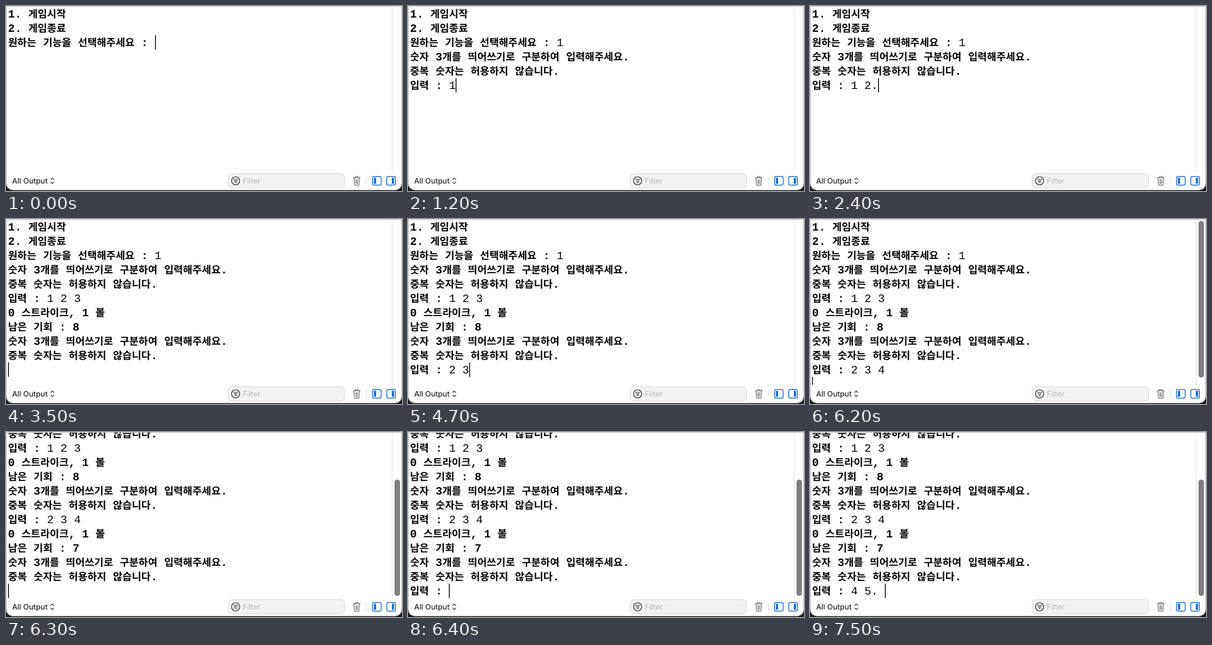
An HTML page that plays this animation: 582x272 px, repeating every 8000 ms.

```html
<!DOCTYPE html>
<html lang="ko">
<head>
<meta charset="utf-8">
<title>Console</title>
<style>
  html, body { margin: 0; width: 100%; height: 100%; overflow: hidden; background: #1c1c1c; }
  svg { display: block; }
  text { white-space: pre; text-rendering: geometricPrecision; }
  .log { font: 700 16.48px "Liberation Mono", monospace; fill: #000; }
  .ko { font: 700 15.06px "Noto Sans CJK KR", "Noto Sans CJK", sans-serif; }
  .typed { font-weight: 400; }
  .ui { font: 500 11px Inter, sans-serif; fill: #262626; }
  .hint { font-weight: 400; fill: #bcbcbc; }
  .line { fill: none; stroke-linecap: round; stroke-linejoin: round; }
</style>
</head>
<body>
<svg width="582" height="272" viewBox="0 0 582 272">
  <defs>
    <clipPath id="pane"><rect x="1" y="1" width="566" height="243"/></clipPath>
  </defs>

  <path d="M0 0H582V261a10 10 0 0 1-10 10H10a10 10 0 0 1-10-10Z" fill="#c4c4c4"/>
  <path d="M1 1H581V261a9 9 0 0 1-9 9H10a9 9 0 0 1-9-9Z" fill="#fff"/>
  <path d="M567.5 1V244" stroke="#e6e6e6"/>

  <g clip-path="url(#pane)">
    <g id="scroll">
      <g id="log" class="log"></g>
      <rect id="caret" width="1.2" height="21"/>
    </g>
  </g>
  <rect id="knob" x="571" width="8" rx="4" fill="#7f7f7f"/>

  <text class="ui" x="9" y="261">All Output</text>
  <path class="line" d="M65.8 255.2l2.2-2.4 2.2 2.4M65.8 258.8l2.2 2.4 2.2-2.4" stroke="#333" stroke-width="1.1"/>

  <rect x="326.5" y="246.5" width="171" height="21" rx="5.5" fill="#f2f2f2" stroke="#dcdcdc"/>
  <g class="line" stroke="#3a3a3a" stroke-width="1.1">
    <circle cx="337.5" cy="257" r="6"/>
    <path d="M334.3 255h6.4M335.4 257.2h4.2M336.6 259.4h1.8"/>
  </g>
  <text class="ui hint" x="348" y="261">Filter</text>

  <g class="line" stroke="#6a6a6a">
    <path d="M510.5 252.5h10M513.5 252.3v-1.6h4v1.6M511.5 252.7l.7 10.8h6.6l.7-10.8"/>
    <path d="M513.8 254.8l.3 6.5M515.5 254.8v6.5M517.2 254.8l-.3 6.5" stroke-width=".8"/>
  </g>
  <path d="M529.5 251V264" stroke="#e2e2e2"/>

  <g fill="none" stroke="#1f6fd0" stroke-width="1.2">
    <rect x="538.6" y="250.6" width="12.8" height="12.8" rx="2.4"/>
    <rect x="559.6" y="250.6" width="12.8" height="12.8" rx="2.4"/>
  </g>
  <g fill="#1f6fd0">
    <rect x="540.6" y="252.6" width="3.4" height="8.8" rx=".8"/>
    <rect x="567" y="252.6" width="3.4" height="8.8" rx=".8"/>
  </g>
</svg>
<script>
const LOOP = 8000, ROW = 21, LEFT = 3;
const KO_W = 13.86, MONO_W = 9.89;
const svgNs = 'http://www.w3.org/2000/svg';
const $ = id => document.getElementById(id);

const ask = ['숫자 3개를 띄어쓰기로 구분하여 입력해주세요.', '중복 숫자는 허용하지 않습니다.'];
const prompt = '입력 : ';
const score = left => ['0 스트라이크, 1 볼', '남은 기회 : ' + left];

// Each line is [label, text the user entered]
const lines = [
  ['1. 게임시작'], ['2. 게임종료'], ['원하는 기능을 선택해주세요 : ', '1'],
  ...ask.map(s => [s]), [prompt, '1 2 3'],
  ...[...score(8), ...ask].map(s => [s]), [prompt, '2 3 4'],
  ...[...score(7), ...ask].map(s => [s]), [prompt]
];

// [ms, visible lines, input on the last one]; no input: caret waits on the next line
const steps = [
  [0, 3, ''], [200, 3, '1'],
  [700, 5], [800, 6, ''],
  [1200, 6, '1'], [1300, 6, '1 '], [1500, 6, '1 2'], [1600, 6, '1 2 '], [1800, 6, '1 2. '],
  [2400, 6, '1 2.'], [2800, 6, '1 2'], [3000, 6, '1 2 '], [3200, 6, '1 2 3'],
  [3500, 10], [3600, 11, ''],
  [4200, 11, '2'], [4400, 11, '2 '], [4700, 11, '2 3'], [4800, 11, '2 3 '], [5100, 11, '2 3. '],
  [5500, 11, '2 3.'], [5600, 11, '2 3'], [5800, 11, '2 3 '], [6000, 11, '2 3 4'],
  [6200, 11], [6300, 15], [6400, 16, ''],
  [6700, 16, '4'], [6900, 16, '4 '], [7100, 16, '4 5'], [7300, 16, '4 5 '], [7500, 16, '4 5. ']
];

function add(parent, tag, cls, text) {
  const el = document.createElementNS(svgNs, tag);
  if (cls) el.setAttribute('class', cls);
  if (text) el.textContent = text;
  return parent.appendChild(el);
}

function set(el, attrs) {
  for (const k in attrs) el.setAttribute(k, attrs[k]);
}

const widthOf = s => [...s].reduce((w, c) => w + (/[가-힣]/.test(c) ? KO_W : MONO_W), 0);

const rows = lines.map(([label], i) => {
  const row = add($('log'), 'text');
  set(row, { x: LEFT, y: 17 + ROW * i, 'xml:space': 'preserve' });
  for (const run of label.match(/[가-힣]+|[^가-힣]+/g))
    add(row, 'tspan', /[가-힣]/.test(run) ? 'ko' : '', run);
  return { row, typed: add(row, 'tspan', 'typed') };
});

function show([ms, count, input]) {
  const waiting = input === undefined;
  rows.forEach(({ row, typed }, i) => {
    row.style.display = i < count ? '' : 'none';
    typed.textContent = i === count - 1 && !waiting ? input : lines[i][1] || '';
  });
  const x = waiting ? LEFT : LEFT + widthOf(lines[count - 1][0] + input);
  set($('caret'), { x: Math.round(x), y: 1 + ROW * (waiting ? count : count - 1) });

  const scrolled = count > 11;
  set($('scroll'), { transform: `translate(0 ${scrolled ? -93 : 0})` });
  set($('knob'), scrolled ? { y: 70, height: 171 } : { y: 3, height: 230 });
  $('knob').style.display = ms >= 6200 ? '' : 'none';
}

let current;
const start = performance.now();
function tick() {
  const t = (performance.now() - start) % LOOP;
  const step = steps.findLast(s => s[0] <= t);
  if (step !== current) show(current = step);
  requestAnimationFrame(tick);
}
tick();
</script>
</body>
</html>
```
